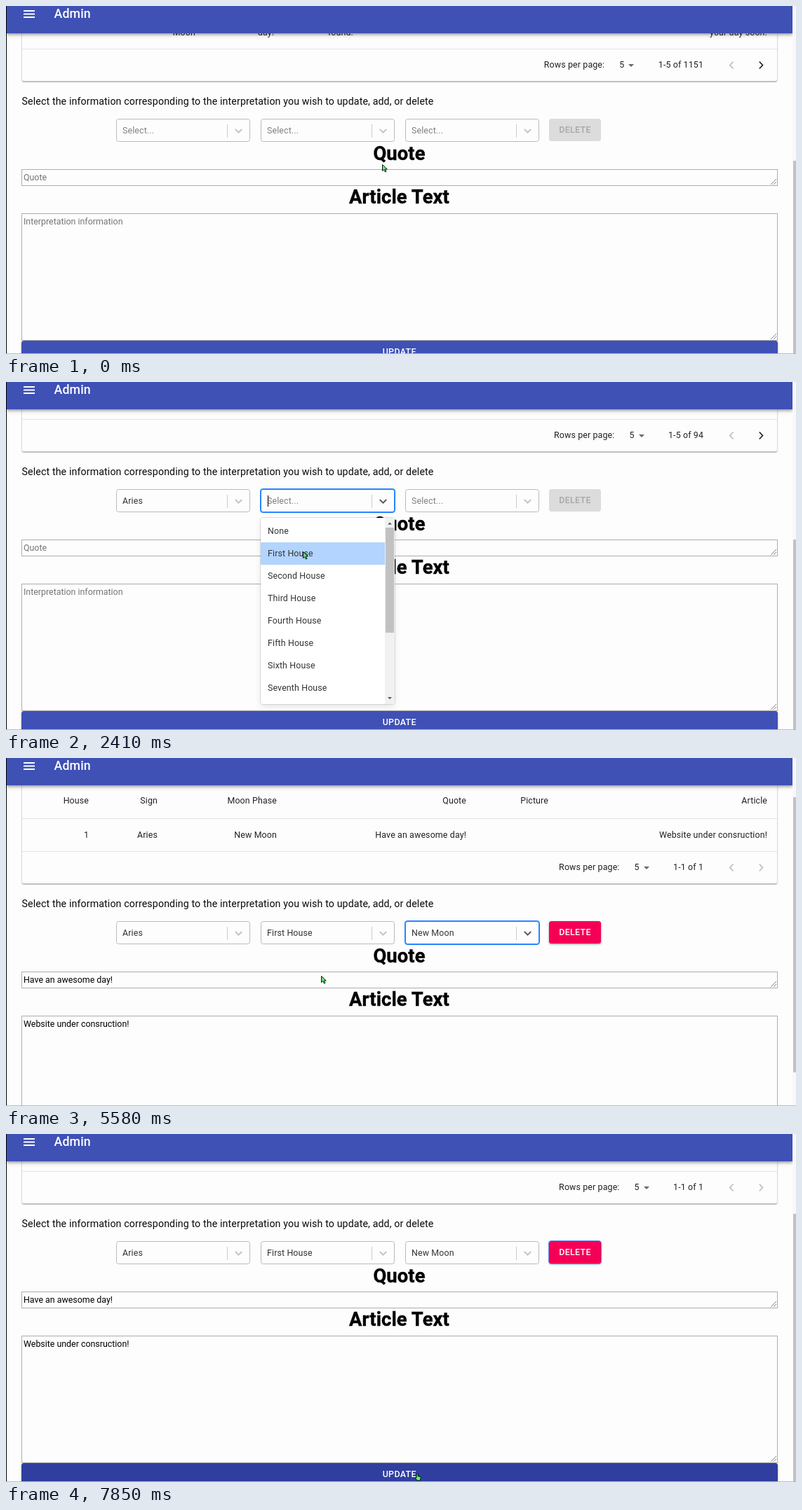
Write an HTML page that moves like this. It is 1126 px wide and 497 px high and loops after 8000 ms.

```html
<!DOCTYPE html>
<html lang="en">
<head>
<meta charset="utf-8">
<title>Admin</title>
<style>
html, body { margin: 0; width: 100%; height: 100%; overflow: hidden; }
#stage { position: relative; width: 1126px; height: 497px; overflow: hidden; background: #fdfdfd;
  font: 12.4px/20px Roboto, sans-serif; letter-spacing: .133px; color: #212121; white-space: nowrap; }
#stage div, #stage svg { position: absolute; box-sizing: border-box; }
svg { overflow: visible; fill: none; }
#page { inset: 0; }
#card { left: 22px; top: -100px; width: 1078px; height: 200px; border: 1px solid #dcdcdc; border-bottom-color: #bdbdbd;
  border-radius: 4px; box-shadow: 0 1px 1px rgba(0,0,0,.25); }
.rule { left: 23px; width: 1076px; height: 1px; background: #e4e4e4; }
#pager { right: 132px; top: 66px; display: flex; align-items: center; }
#pager i { border: solid transparent; border-width: 4.5px 4.5px 0; border-top-color: #666; margin: 1px 34.5px 0 6px; }
#pager b { font-weight: 400; margin-left: 21px; }
#intro { left: 22.5px; top: 118px; font-size: 14.18px; color: #0a0a0a; }
h1 { position: absolute; left: 22px; width: 1077px; margin: 0; text-align: center;
  font: 700 27.3px/39px Roboto, sans-serif; color: #000; -webkit-text-stroke: .4px #000; }
.area { left: 22px; width: 1077.5px; border: 1px solid #adadad; background: #fdfdfd; padding: 1px 2px; letter-spacing: 0; }
.area svg { right: 1px; bottom: 1px; stroke: #888; }
.button { font-weight: 500; letter-spacing: .354px; text-align: center; line-height: 32px; border-radius: 3.5px; }
#delete { left: 774px; top: 153px; width: 74px; height: 32px; }
#update { left: 22px; top: 470px; width: 1077.5px; height: 32px; color: #fff; box-shadow: 0 1px 3px rgba(0,0,0,.3); }
.select { top: 153px; width: 191px; height: 33px; border: 1px solid #bababa; border-radius: 3.5px; background: #fdfdfd; }
.select.focus { border-color: #2684ff; box-shadow: 0 0 0 1px #2684ff; }
.value { left: 8px; top: 6px; }
.bar { left: 157px; top: 7px; width: 1px; height: 19px; background: #ccc; }
.caret { left: 9px; top: 8px; width: 1px; height: 16px; background: #000; }
.chevron { left: 168px; top: 13px; stroke: #c4c4c4; stroke-width: 2; }
.focus .chevron { stroke: #5c5c5c; }
.menu { left: -1px; top: 40px; width: 191px; height: 266px; padding-top: 3px; overflow: hidden; background: #fff; border-radius: 3.5px;
  box-shadow: 0 0 0 1px rgba(0,0,0,.1), 0 3.5px 10px rgba(0,0,0,.1); z-index: 5; }
.menu p { margin: 0; padding-left: 10px; height: 32px; line-height: 32px; color: #333; }
.menu .track { right: 0; top: 0; width: 14px; height: 100%; background: #f1f1f1; }
.menu .thumb { left: 1px; top: 14px; width: 12px; background: #c1c1c1; }
.menu svg { left: 4px; top: 6px; fill: #505050; }
#header { left: 1px; top: 0; width: 1120px; height: 39px; background: #3f51b5; z-index: 8;
  box-shadow: 0 2px 3px rgba(0,0,0,.25), 0 3px 6px rgba(0,0,0,.15); }
#header svg { stroke: #fff; stroke-width: 1.77; }
#header div { left: 67.5px; top: 1px; font-size: 17.73px; font-weight: 500; color: #fff; }
#rail { left: 1121px; top: 0; width: 5px; height: 497px; background: #f8f8f8; z-index: 9; }
#thumb { left: 1px; width: 4px; height: 393px; background: #c1c1c1; }
.edge { z-index: 12; background: #000; }
#dialog { left: 370px; top: -20px; width: 397px; height: 116px; background: #fff; border: 1px solid #c4c4c4; border-radius: 2px;
  box-shadow: 0 2px 5px rgba(0,0,0,.35); z-index: 10; font-family: "Open Sans", sans-serif; letter-spacing: 0; color: #202124; }
#dialog .button { top: 71px; height: 29px; line-height: 27px; font-size: 10.3px; font-weight: 600; letter-spacing: 0; border: 1px solid #e4e6ea; color: #1a73e8; }
#cursor { z-index: 20; left: 0; top: 0; fill: #5cf06a; stroke: #000; stroke-width: .9; stroke-linejoin: round; }
</style>
</head>
<body>
<div id="stage">
  <div id="page">
    <div id="card"></div>
    <div id="many"></div>
    <div id="single"></div>
    <div class="rule" style="top:53px"></div>
    <div id="pager"><span>Rows per page:</span><b>5</b><i></i><span id="count"></span></div>
    <svg id="prev" style="left:1031px;top:71px" stroke="#bdbdbd" stroke-width="1.7"><path d="M5.500 .5L.8 5.500L5.500 10.500"/></svg>
    <svg id="next" style="left:1073px;top:71px" stroke-width="1.7"><path d="M.8 .5L5.500 5.500L.8 10.500"/></svg>
    <div id="intro">Select the information corresponding to the interpretation you wish to update, add, or delete</div>
    <div id="delete" class="button">DELETE</div>
    <h1 style="top:184px">Quote</h1>
    <div class="area" style="top:225px;height:24px"><span id="quote"></span><svg width="8" height="8"><path d="M0 8L8 0M4 8L8 4"/></svg></div>
    <h1 style="top:246px">Article Text</h1>
    <div class="area" style="top:287.500px;height:182px"><span id="article"></span><svg width="8" height="8"><path d="M0 8L8 0M4 8L8 4"/></svg></div>
    <div id="update" class="button">UPDATE</div>
  </div>
  <div id="header">
    <svg style="left:24px;top:0"><path d="M0 7H16M0 11.500H16M0 16H16"/></svg>
    <div>Admin</div>
  </div>
  <div id="rail"><div id="thumb"></div></div>
  <div id="dialog">
    <div style="left:13px;top:13px;font-size:12.64px">floating-cliffs-61030.herokuapp.com says</div>
    <div style="left:13px;top:39px;font-size:10.85px;color:#5f6368">Delete this interpretation?</div>
    <div class="button" style="left:254px;width:61px;background:#3f8af0;border-color:#3b7fe0;color:#fff">OK</div>
    <div class="button" style="left:322px;width:61px">Cancel</div>
  </div>
  <div class="edge" style="left:0;top:0;width:1px;height:497px"></div>
  <div class="edge" style="left:0;top:496px;width:1126px;height:1px;background:#bbb"></div>
  <svg id="cursor" width="14" height="16">
    <path id="arrow" d="M.5 .5V9.500L2.700 7.600L4.400 11L6 10.200L4.400 7H7.300Z"/>
    <path id="hand" d="M2 1.500Q3 0 4 1.500V4.500L7.500 5.500Q8.500 6 8 8L7 11H3L.5 7.500Q0 6 2 7Z"/>
  </svg>
</div>
<script>
const LOOP = 8000;
const $ = id => document.getElementById(id);
const show = (el, on) => { el.style.visibility = on ? 'visible' : 'hidden'; };
const between = (t, a, b) => t >= a && t < b;
const ramp = (t, a, b) => { const u = Math.min(1, Math.max(0, (t - a) / (b - a))); return u * u * (3 - 2 * u); };
const mix = (a, b, u) => `color-mix(in srgb, ${b} ${u * 100}%, ${a})`;

// open, press and pick are the times of the clicks on each select
const selects = [
  { x: 157, open: 1040, press: 1540, pick: 1700, blur: 2080,
    options: ['None', 'Aries', 'Taurus', 'Gemini', 'Cancer', 'Leo', 'Virgo', 'Libra', 'Scorpio', 'Sagittarius', 'Capricorn', 'Aquarius', 'Pisces'] },
  { x: 363, open: 2080, press: 2370, pick: 2560, blur: 3030,
    options: ['None', ...['First', 'Second', 'Third', 'Fourth', 'Fifth', 'Sixth', 'Seventh', 'Eighth', 'Ninth', 'Tenth', 'Eleventh', 'Twelfth'].map(n => n + ' House')] },
  { x: 569, open: 3030, press: 3340, pick: 3430, blur: 6300,
    options: ['None', 'New Moon', 'Waxing Crescent', 'First Quarter', 'Waxing Gibbous', 'Full Moon', 'Waning Gibbous', 'Last Quarter', 'Waning Crescent'] }
];
const LOADED = 3560, DIALOG = [6370, 7050], DELETE_HOVER = 6130, UPDATE_HOVER = 7570;
const counts = [[0, '1-5 of 1151'], [1900, '1-5 of 94'], [2760, '1-5 of 8'], [LOADED, '1-1 of 1']];
const path = [
  [0, 536, 226], [150, 536, 226], [900, 285, 165], [1100, 285, 165], [1500, 289, 240], [1700, 289, 240],
  [2060, 415, 166], [2150, 415, 166], [2390, 423, 242], [2560, 423, 242], [2950, 640, 166], [3100, 640, 166],
  [3320, 648, 240], [3430, 648, 240], [3570, 690, 212], [3730, 690, 212], [4500, 440, 300], [5000, 449, 311],
  [5730, 449, 311], [6200, 800, 166], [6400, 800, 166], [6870, 650, 72], [7040, 650, 72], [7430, 600, 423],
  [7640, 583, 484], [LOOP, 583, 484]
];

function cells(parent, y, list) {
  for (const [text, right] of list)
    parent.insertAdjacentHTML('beforeend', `<div style="left:${right - 300}px;width:300px;top:${y - 10}px;text-align:right">${text}</div>`);
}
const columns = [118, 216, 386, 656, 773, 1085];
const row = texts => texts.map((text, i) => [text, columns[i]]);
cells($('many'), 30, [['Moon', 270], ['day!', 382], ['found.', 495], ['your day soon.', 1085]]);
cells($('single'), -19, row(['House', 'Sign', 'Moon Phase', 'Quote', 'Picture', 'Article']));
cells($('single'), 30, row(['1', 'Aries', 'New Moon', 'Have an awesome day!', '', 'Website under consruction!']));
$('single').insertAdjacentHTML('beforeend', '<div class="rule" style="top:6px"></div>');

for (const s of selects) {
  const thumb = 238 * 266 / (s.options.length * 32 + 7);
  const el = s.el = document.createElement('div');
  el.style.left = s.x + 'px';
  el.innerHTML = `<div class="value"></div><div class="caret"></div><div class="bar"></div>
    <svg class="chevron" width="12" height="8"><path d="M.8 1L5.500 5.700L10.200 1"/></svg>
    <div class="menu">${s.options.map(o => `<p>${o}</p>`).join('')}
      <div class="track"><svg><path d="M0 3.500H6L3 .5Z"/></svg><div class="thumb" style="height:${thumb}px"></div>
      <svg style="top:256px"><path d="M0 0H6L3 3Z"/></svg></div></div>`;
  [s.value, s.caret, s.menu] = ['.value', '.caret', '.menu'].map(q => el.querySelector(q));
  s.items = [...el.querySelectorAll('p')];
  $('page').append(el);
}

function pointer(t) {
  const i = path.findIndex(k => k[0] > t);
  const [a, b] = [path[i - 1], path[i]], u = ramp(t, a[0], b[0]);
  return [a[1] + (b[1] - a[1]) * u, a[2] + (b[2] - a[2]) * u];
}

function drawSelect(s, t, y) {
  const open = between(t, s.open, s.pick), picked = t >= s.pick;
  s.el.className = between(t, s.open, s.blur) ? 'select focus' : 'select';
  s.el.style.zIndex = open ? 5 : 1;
  s.value.textContent = picked ? s.options[1] : 'Select...';
  s.value.style.color = picked ? '#333' : '#808080';
  show(s.caret, open && (t - s.open) % 1000 < 500);
  s.menu.style.display = open ? '' : 'none';
  const hover = Math.max(0, Math.floor((y - 197) / 32));
  s.items.forEach((p, i) => {
    p.style.background = i !== hover ? '' : t >= s.press ? '#b2d4ff' : '#deebff';
  });
}

function drawDelete(t) {
  const style = $('delete').style, on = ramp(t, 3350, 3640), focus = t >= 6300;
  const pressed = between(t, ...DIALOG);
  let fill = mix('#dcdcdc', '#f50057', on);
  if (between(t, DELETE_HOVER, DIALOG[0])) fill = mix('#f50057', '#c51162', ramp(t, DELETE_HOVER, 6300));
  else if (pressed) fill = '#d9558c';
  else if (t >= DIALOG[1]) fill = mix('#d9558c', '#f50057', ramp(t, DIALOG[1], 7300));
  style.background = fill;
  style.color = mix('#a6a6a6', '#ffffff', on);
  style.boxShadow = (focus ? '0 0 0 1px #6a8df0, ' : '')
    + (pressed ? '0 3px 8px rgba(0,0,0,.35)' : `0 1px 3px rgba(0,0,0,${.4 * on})`);
}

function draw(t) {
  const [x, y] = pointer(t), loaded = t >= LOADED;
  const scroll = Math.round(8 * (1 - ramp(t, 150, 330)) + 80 * (ramp(t, 4620, 4900) - ramp(t, 5760, 6000)));
  $('page').style.transform = `translateY(${scroll}px)`;
  $('thumb').style.top = (loaded ? 114 - scroll * .725 : 225 - scroll * .5) + 'px';
  show($('many'), !loaded);
  show($('single'), loaded);
  $('count').textContent = counts.filter(c => t >= c[0]).pop()[1];
  $('next').style.stroke = loaded ? '#bdbdbd' : '#222';

  selects.forEach(s => drawSelect(s, t, y));
  $('quote').textContent = loaded ? 'Have an awesome day!' : 'Quote';
  $('article').textContent = loaded ? 'Website under consruction!' : 'Interpretation information';
  $('quote').style.color = $('article').style.color = loaded ? '#000' : '#757575';

  drawDelete(t);
  $('update').style.background = mix('#3f51b5', '#303f9f', ramp(t, UPDATE_HOVER, 7820));
  show($('dialog'), between(t, ...DIALOG));

  const hand = between(t, DELETE_HOVER, DIALOG[0]) || t >= UPDATE_HOVER;
  show($('hand'), hand);
  show($('arrow'), !hand);
  $('cursor').style.transform = `translate(${Math.round(x)}px, ${Math.round(y)}px)`;
}

const start = performance.now();
function tick() {
  draw((performance.now() - start) % LOOP);
  requestAnimationFrame(tick);
}
tick();
</script>
</body>
</html>
```
